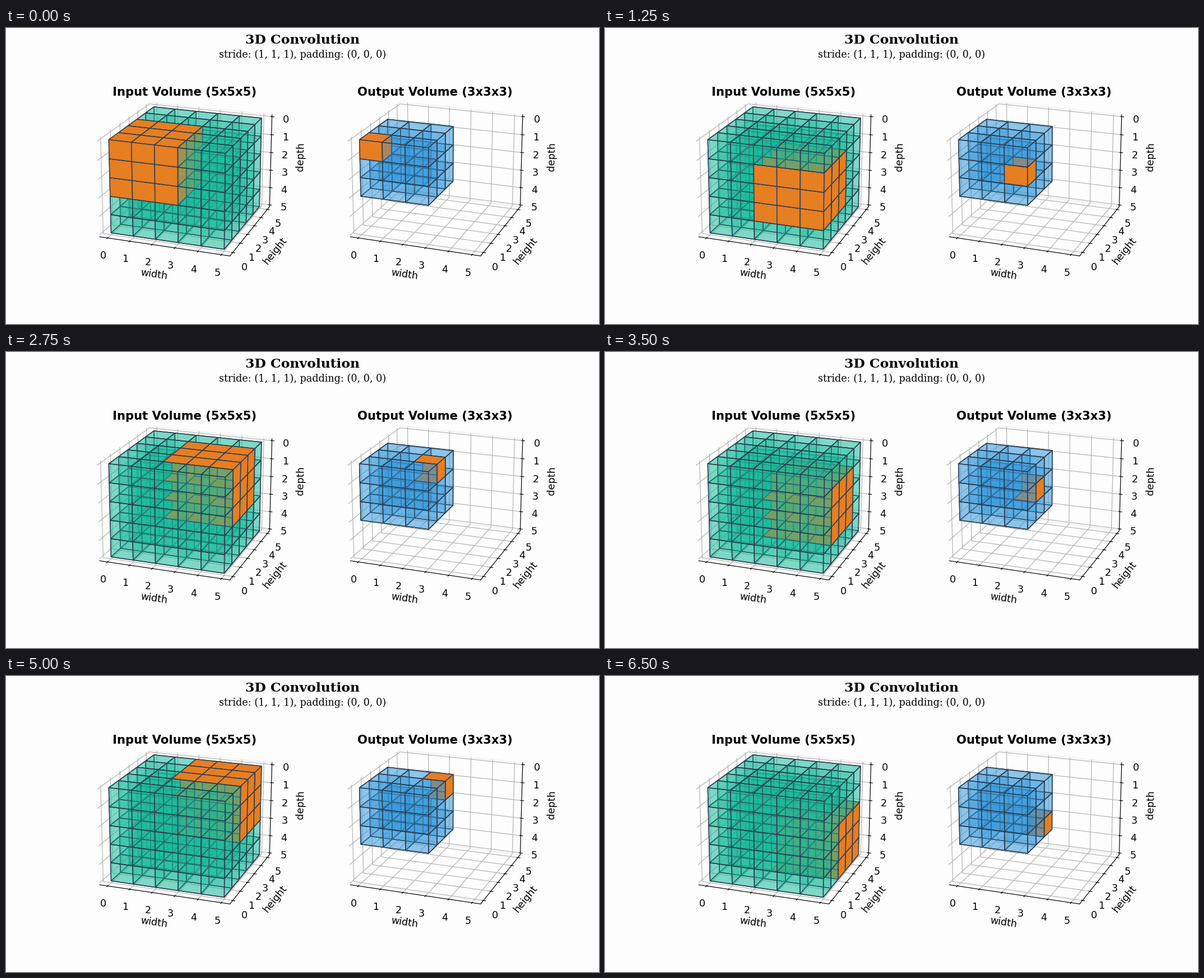
A matplotlib script for the animation above (6.75 s loop, 1058 by 529 pixels).

```python
import itertools

import matplotlib.pyplot as plt
import numpy as np
from matplotlib.animation import FuncAnimation
from matplotlib.colors import to_rgba
from mpl_toolkits.mplot3d.art3d import Poly3DCollection

SIZE, KERNEL = 5, 3
OUT = SIZE - KERNEL + 1
ALPHA = 1 / 3
BACKGROUND = "#fdfdfd"
EDGE = "#2c3e50"
TEAL = to_rgba("#1abc9c", ALPHA)
BLUE = to_rgba("#3498db", ALPHA)
ORANGE = to_rgba("#e67e22")

plt.rcParams.update({
    "font.size": 12,
    "font.family": "DejaVu Sans",
    "figure.facecolor": BACKGROUND,
    "axes.facecolor": BACKGROUND,
})


def square(corner, axis):
    """Unit square starting at corner, perpendicular to axis."""
    u, v = np.delete(np.eye(3), axis, axis=0)
    return [corner, corner + u, corner + u + v, corner + v]


def cell_faces(cell):
    """Far faces of a cell, plus near faces on the outside of the volume."""
    faces = []
    for axis in range(3):
        corner = np.array(cell, float)
        if cell[axis] == 0:
            faces.append(square(corner, axis))
        faces.append(square(corner + np.eye(3)[axis], axis))
    return faces


def add_volume(ax, n):
    cells = {}
    for cell in itertools.product(range(n), repeat=3):
        poly = Poly3DCollection(cell_faces(cell), edgecolors=EDGE, linewidths=1)
        ax.add_collection3d(poly)
        cells[cell] = poly
    return cells


def padded(low, high, margin):
    pad = (high - low) * margin
    return low - pad, high + pad


def make_axes(fig, index, name, n):
    ax = fig.add_subplot(1, 2, index, projection="3d")
    ax.set_title(f"{name} Volume ({n}x{n}x{n})", weight="bold", y=0.945)
    ax.view_init(elev=20, azim=-70)
    side = padded(*padded(0, SIZE, 0.05), 1 / 48)
    ax.set_xlim(*side)
    ax.set_ylim(*side)
    ax.set_zlim(*padded(SIZE, 0, 1 / 48))
    ax.set(xlabel="width", ylabel="height", zlabel="depth")
    for axis in (ax.xaxis, ax.yaxis, ax.zaxis):
        axis.set_ticks(range(SIZE + 1))
        axis.pane.fill = False
    return ax


def paint(cells, start, extent, color):
    for cell, poly in cells.items():
        active = all(s <= c < s + extent for c, s in zip(cell, start))
        poly.set_facecolor(ORANGE if active else color)


fig = plt.figure(figsize=(10, 5), dpi=105.8)
fig.suptitle("3D Convolution", family="DejaVu Serif", weight="bold", size=16)
fig.text(0.5, 0.9, "stride: (1, 1, 1), padding: (0, 0, 0)",
         family="DejaVu Serif", ha="center")

inputs = add_volume(make_axes(fig, 1, "Input", SIZE), SIZE)
outputs = add_volume(make_axes(fig, 2, "Output", OUT), OUT)


def update(step):
    height, depth, width = np.unravel_index(step, (OUT, OUT, OUT))
    start = (width, height, depth)
    paint(inputs, start, KERNEL, TEAL)
    paint(outputs, start, 1, BLUE)
    return []


anim = FuncAnimation(fig, update, frames=OUT ** 3, interval=250,
                     init_func=lambda: update(0), repeat=True)
plt.show()
```
